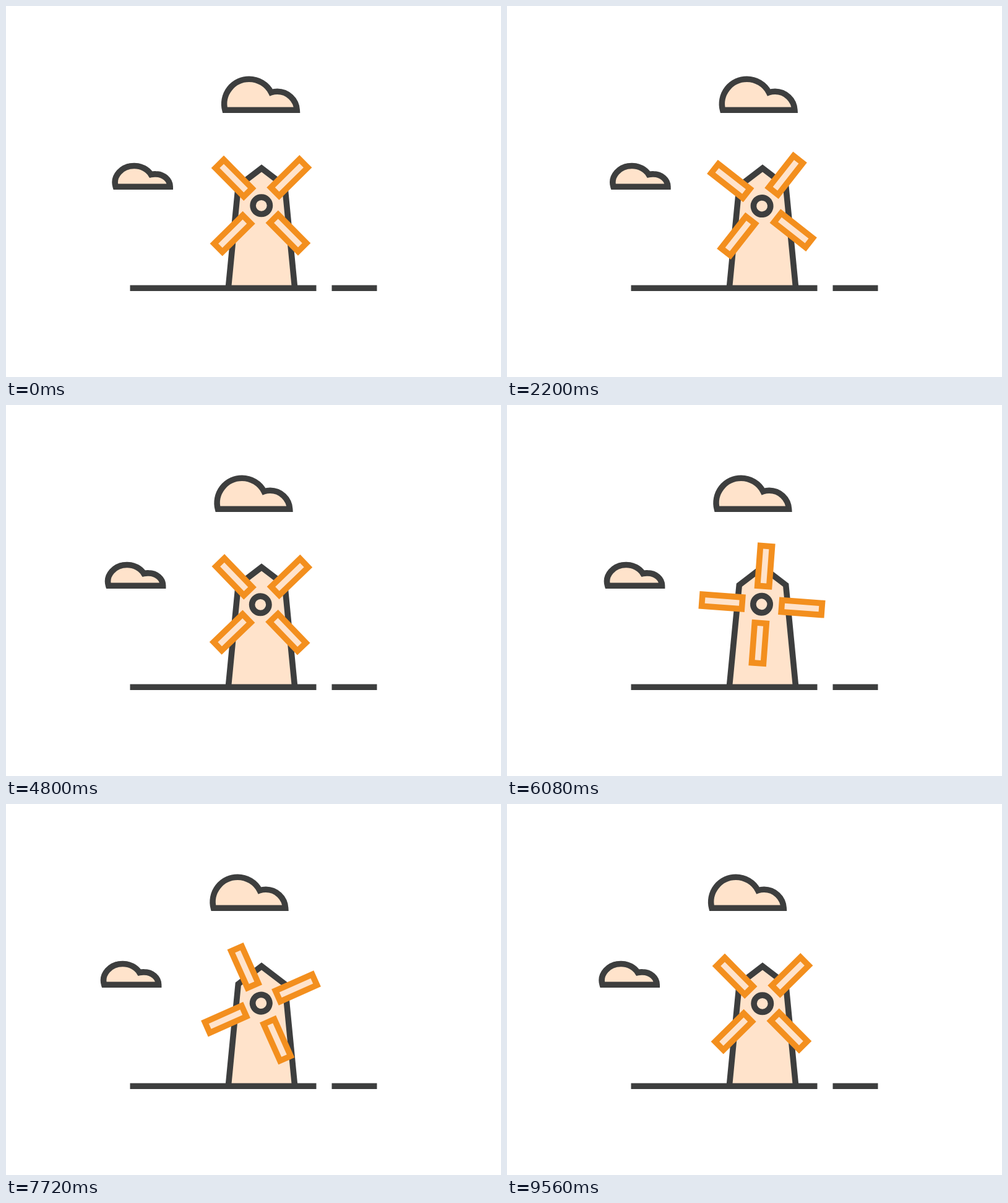
An HTML page for the animation above (9.6 s loop, 800x600 px).

```html
<!DOCTYPE html>
<html lang="en">
<head>
<meta charset="utf-8">
<title>Windmill</title>
<style>
  html, body { margin: 0; width: 100%; height: 100%; overflow: hidden; background: #fff; }
  svg { display: block; width: 100%; height: 100%; }
</style>
</head>
<body>
<svg viewBox="0 0 800 600" fill="#ffe3cb" stroke="#3d3e3e" stroke-width="9.6">
  <g id="clouds">
    <path d="M353.9 168.2A40.2 40.2 0 0 1 392.9 118.2A40.2 40.2 0 0 1 428.6 139.8
             A31.8 31.8 0 0 1 438.5 138.2A31.8 31.8 0 0 1 470.2 168.2Z"/>
    <path d="M177.2 292.3A31 27 0 0 1 207.2 258.5A31 27 0 0 1 234.3 272.6
             A23.4 20 0 0 1 242 271.9A23.4 20.4 0 0 1 265.2 292.3Z"/>
  </g>
  <path d="M359.3 456.2L375.3 291.3L413 262.4L450.7 291.3L466.7 456.2"/>
  <path d="M200.5 456.2H501.5M526.5 456.2H599.5"/>
  <g id="sails">
    <circle cx=".75" r="13.7"/>
    <g stroke="#f38f1e">
      <rect id="sail" x="32" y="-9.5" width="65" height="19" transform="rotate(-44.7)"/>
      <rect x="29.9" y="-9.5" width="65" height="19" transform="rotate(45.3)"/>
      <rect x="32" y="-9.5" width="65" height="19" transform="rotate(135.3)"/>
      <rect x="29.9" y="-9.5" width="65" height="19" transform="rotate(225.3)"/>
    </g>
  </g>
</svg>
<script>
  const LOOP = 9600, STEP = 40, DRIFT = 23;
  const clouds = document.getElementById('clouds');
  const sails = document.getElementById('sails');

  function draw() {
    const time = Math.floor(performance.now() % LOOP / STEP) * STEP;
    const progress = time / (LOOP - STEP);
    clouds.setAttribute('transform', `translate(${-DRIFT * progress} 0)`);
    sails.setAttribute('transform', `translate(412 322.8) rotate(${360 * progress})`);
    requestAnimationFrame(draw);
  }
  draw();
</script>
</body>
</html>
```
